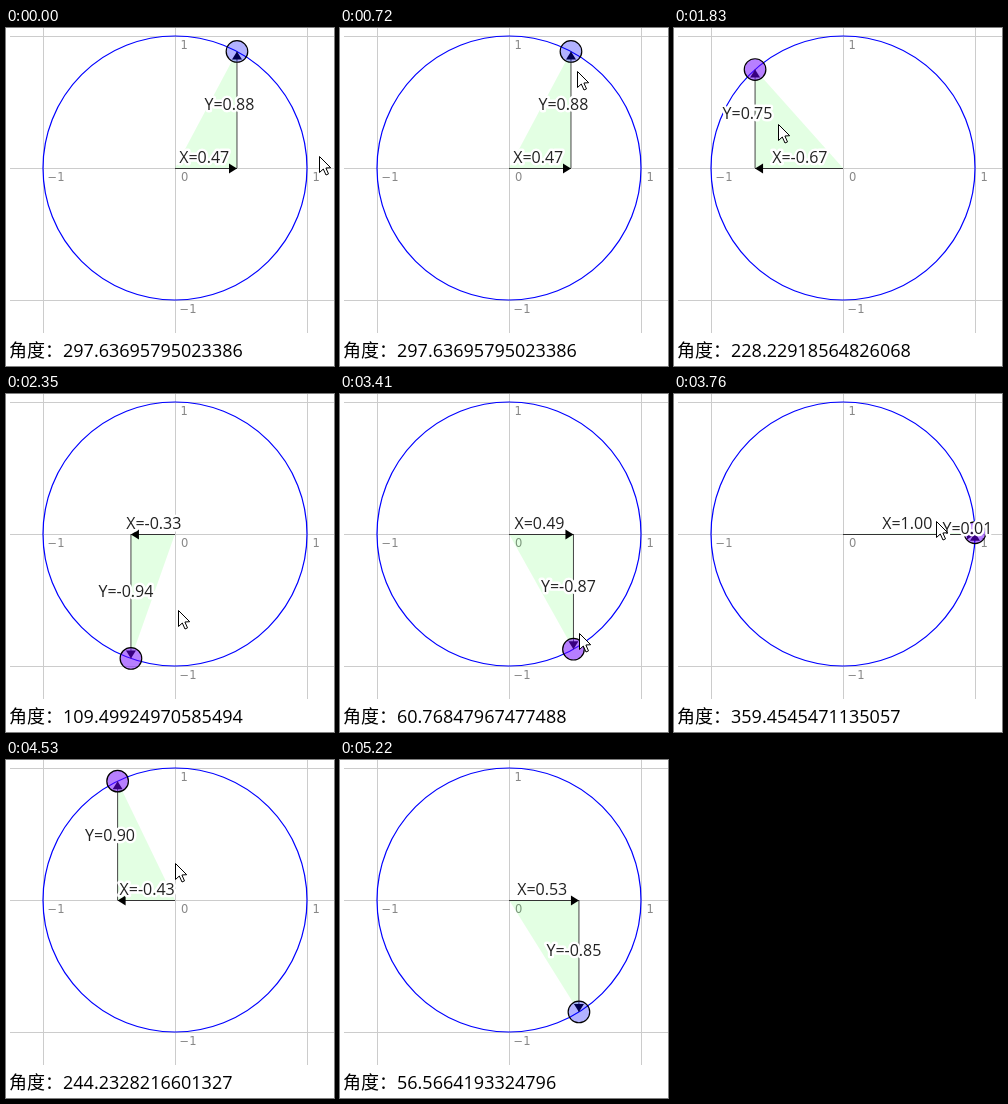
Write an HTML page with a canvas that moves like this. It is 328x338 px and loops after 5900 ms.

```html
<!DOCTYPE html>
<html lang="zh-CN">
<head>
<meta charset="utf-8">
<title>Unit circle</title>
<style>
html, body { margin: 0; width: 100%; height: 100%; overflow: hidden; background: #fff; }
canvas { display: block; }
</style>
</head>
<body>
<canvas id="stage" width="328" height="338"></canvas>
<script>
const ctx = document.getElementById('stage').getContext('2d');
const LOOP = 5900, STEP = 57.9, LEAD = 80;
const PRESS = 900, RELEASE = 2770, GRAB = 3290, DRAG = 3410, END = 5220;
const CX = 169, CY = 140, R = 132;
const SANS = '"Open Sans", "Noto Sans CJK TC", "Noto Sans CJK", sans-serif';

// The picture advances in steps, restarting at each new gesture.
const gestures = [0, 270, PRESS, RELEASE, DRAG, END];

// Turning points of the drags: time, clockwise degrees, pointer distance from the centre
const REST = 60.76847967477488;
const turns = [
  [PRESS, 297.63695795023386, 126],
  [1360, 284.03798637668575, 122],
  [2110, 177, 60],
  [2350, 109.49924970585494, 76],
  [2580, REST, 88],
  [RELEASE, REST, 88],
  [GRAB, REST, 121],
  [DRAG, REST, 121],
  [3850, -8, 84],
  [4100, 76.05585689743396, 51],
  [4510, 244.2328216601327, 37],
  [END, 416.5664193324796, 60]
];

const clamp = u => Math.min(1, Math.max(0, u));
const ease = u => u * u * (3 - 2 * u);
const mix = (a, b, u) => a + (b - a) * u;

function slope(i, col) {
  return (turns[i + 1][col] - turns[i][col]) / (turns[i + 1][0] - turns[i][0]);
}

// Tangent that never overshoots: zero at the ends and where the direction reverses
function tangent(i, col) {
  if (i === 0 || i === turns.length - 1) return 0;
  const a = slope(i - 1, col), b = slope(i, col);
  return a * b > 0 ? 2 * a * b / (a + b) : 0;
}

function follow(t, col) {
  const last = turns.length - 1;
  if (t <= turns[0][0]) return turns[0][col];
  if (t >= turns[last][0]) return turns[last][col];
  const i = turns.findIndex(k => k[0] > t) - 1;
  const span = turns[i + 1][0] - turns[i][0];
  const u = (t - turns[i][0]) / span, v = 1 - u;
  return mix(turns[i][col], turns[i + 1][col], ease(u)) +
    span * u * v * (v * tangent(i, col) - u * tangent(i + 1, col));
}

function snap(t) {
  const start = gestures.filter(g => g <= t).pop();
  const at = start + Math.floor((t - start) / STEP) * STEP;
  return Math.round(at / 10) * 10;
}

function wrap(a) {
  if (a < 0) return a + 360;
  return a < 360 ? a : +(a - 360).toFixed(13);
}

function polar(deg, r) {
  const a = deg * Math.PI / 180;
  return [CX + r * Math.cos(a), CY + r * Math.sin(a)];
}

// The pointer glides to the ball, then leads it around the circle.
function pointer(t) {
  if (t >= PRESS) return polar(follow(t + LEAD, 1), follow(t, 2));
  const settle = clamp(t / 100), glide = ease(clamp((t - 200) / 650));
  return [
    mix(mix(313, 309, settle), 222, glide),
    mix(mix(128, 134, settle), 25, glide)
  ];
}

function line(x1, y1, x2, y2, color) {
  ctx.strokeStyle = color;
  ctx.lineWidth = 1;
  ctx.beginPath();
  ctx.moveTo(x1, y1);
  ctx.lineTo(x2, y2);
  ctx.stroke();
}

function poly(points, fill) {
  ctx.fillStyle = fill;
  ctx.beginPath();
  points.forEach(p => ctx.lineTo(...p));
  ctx.closePath();
  ctx.fill();
}

function circle(x, y, r, width, stroke, fill) {
  ctx.beginPath();
  ctx.arc(x, y, r, 0, 2 * Math.PI);
  if (fill) {
    ctx.fillStyle = fill;
    ctx.fill();
  }
  ctx.strokeStyle = stroke;
  ctx.lineWidth = width;
  ctx.stroke();
}

function label(text, x, y) {
  ctx.font = '16px ' + SANS;
  ctx.strokeStyle = '#fff';
  ctx.lineWidth = 5;
  ctx.lineJoin = 'round';
  ctx.strokeText(text, x, y);
  ctx.fillStyle = '#222';
  ctx.fillText(text, x, y);
}

function drawGrid() {
  for (const d of [-R, 0, R]) {
    line(CX + d + 0.5, 0, CX + d + 0.5, 305, '#ccc');
    line(4, CY + d + 0.5, 328, CY + d + 0.5, '#ccc');
  }
  ctx.font = '11.5px "DejaVu Sans", sans-serif';
  ctx.fillStyle = '#888';
  ctx.fillText('1', 174.5, 21);
  ctx.fillText('0', 175, 153);
  ctx.fillText('1', 306.5, 153);
  ctx.fillText('−1', 41.5, 153);
  ctx.fillText('−1', 173.5, 285);
  circle(CX, CY, R, 1.2, '#00f');
}

function drawPointer(x, y) {
  ctx.save();
  ctx.translate(Math.round(x) + 0.5, Math.round(y) + 0.5);
  poly([[0, 0], [0, 16], [3.8, 12.5], [6.5, 18.5], [9, 17.4], [6.4, 11.5], [11.2, 11.2]], '#fff');
  ctx.strokeStyle = '#000';
  ctx.lineWidth = 1;
  ctx.lineJoin = 'miter';
  ctx.stroke();
  ctx.restore();
}

function draw(time) {
  const t = snap(time);
  const angle = follow(t, 1);
  // The readout trails the ball slightly while nothing is dragged.
  const lag = t < PRESS ? 0.363 : t >= END ? 1.434 : 0;
  const [x, y] = polar(angle + lag, R);
  const sx = Math.sign(x - CX), sy = Math.sign(y - CY);
  const pressed = t >= PRESS && t < RELEASE || t >= GRAB && t < END;

  ctx.fillStyle = '#fff';
  ctx.fillRect(0, 0, 328, 338);
  drawGrid();

  const axis = CY + 0.5;
  poly([[CX, CY], [x, CY], [x, y]], 'rgba(0,255,0,.11)');
  line(CX, axis, x, axis, '#333');
  line(x, CY, x, y, '#444');
  poly([[x, axis], [x - 8 * sx, axis - 5], [x - 8 * sx, axis + 5]], '#000');
  poly([[x, y], [x - 5, y - 8 * sy], [x + 5, y - 8 * sy]], '#000');
  circle(x, y, 10.8, 1.2, '#000', pressed ? 'rgba(112,0,255,.5)' : 'rgba(0,0,255,.3)');

  label('X=' + ((x - CX) / R).toFixed(2), (CX + x) / 2 - 26.8, 135);
  label('Y=' + ((CY - y) / R).toFixed(2), x - 32.5, (CY + y) / 2 + 0.5);

  ctx.font = '18px ' + SANS;
  ctx.fillStyle = '#000';
  ctx.fillText('角度：' + wrap(angle), 3, 329);

  if (t < END) drawPointer(...pointer(t));
}

const begin = performance.now();
function tick() {
  draw((performance.now() - begin) % LOOP);
  requestAnimationFrame(tick);
}
tick();
</script>
</body>
</html>
```
